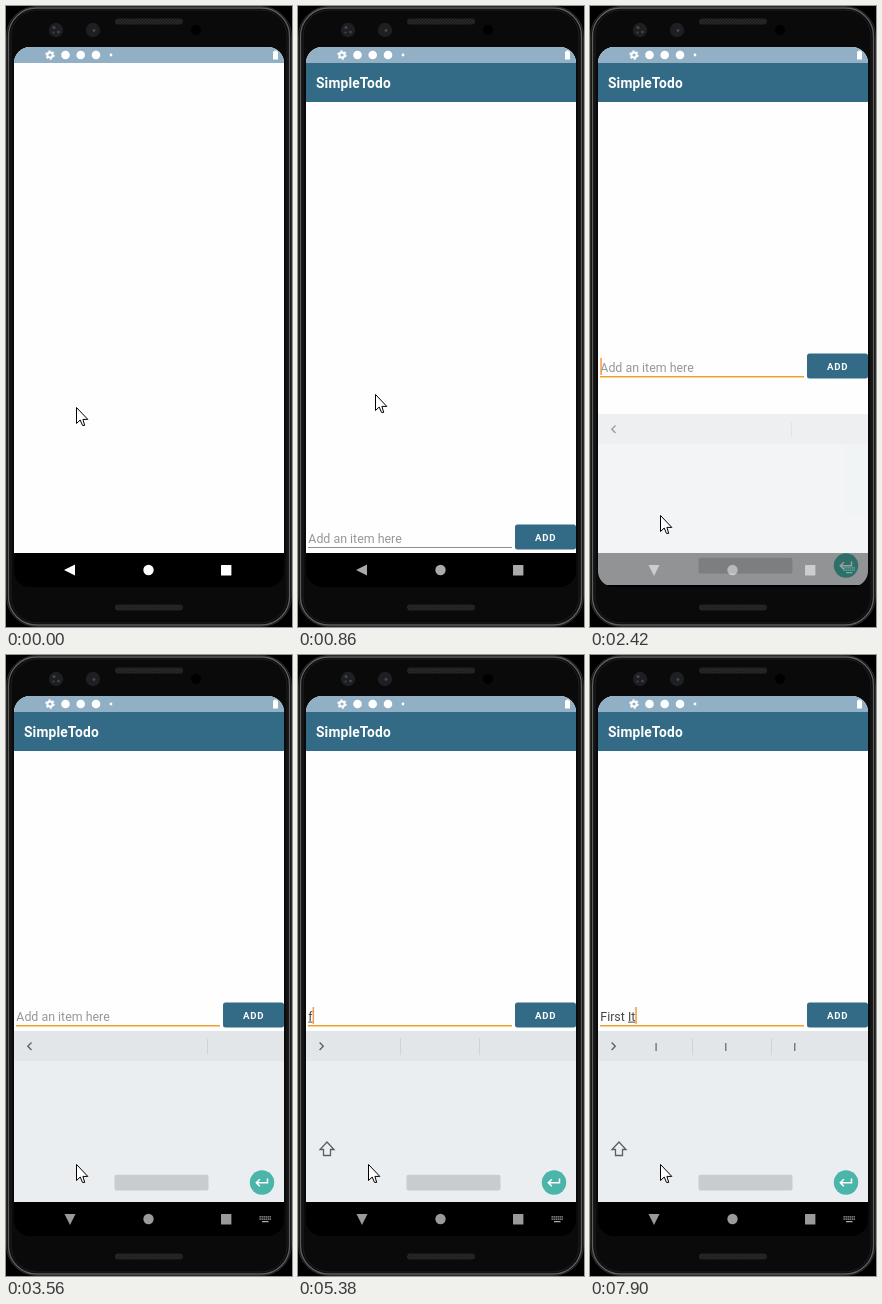
An HTML page for the animation above (8 s loop, 286x621 px).

```html
<!DOCTYPE html>
<html lang="en">
<head>
<meta charset="utf-8">
<title>Todo app on a phone</title>
<style>
  html, body { margin: 0; width: 100%; height: 100%; overflow: hidden; background: #000; }
  svg { display: block; width: 286px; height: 621px; font-family: Roboto, sans-serif; }
  text { white-space: pre; }
  .field { font-size: 12.4px; }
  .strong { font-weight: 600; fill: #fff; }
  .hints text { font-size: 11.5px; fill: #4f565a; text-anchor: middle; }
  .icon { fill: none; stroke: #566066; stroke-width: 1.3; }
</style>
</head>
<body>
<svg viewBox="0 0 286 621">
  <defs>
    <clipPath id="screen"><rect x="8" y="41" width="270" height="540" rx="16"/></clipPath>
    <pattern id="mesh" width="3" height="3" patternUnits="userSpaceOnUse">
      <rect width="3" height="3" fill="#1c1c1c"/>
      <path d="M0 0L3 3M3 0L0 3" stroke="#303030" stroke-width=".6"/>
    </pattern>
  </defs>

  <!-- Phone body -->
  <g fill="none">
    <rect x=".5" y=".5" width="285" height="620" rx="30" fill="#0a0a0a" stroke="#2c2c2c"/>
    <rect x="2.5" y="2" width="281" height="617" rx="28" stroke="#5e5e5e" stroke-width="1.4"/>
    <rect x="5" y="4" width="276" height="613" rx="26" stroke="#1f1f1f"/>
  </g>
  <rect x="109" y="12.5" width="68" height="6" rx="3" fill="url(#mesh)"/>
  <rect x="109" y="598.5" width="68" height="6" rx="3" fill="url(#mesh)"/>
  <g fill="#1d1f22">
    <circle cx="50" cy="24" r="7.2"/><circle cx="87" cy="24" r="7.2"/>
    <circle cx="190" cy="24" r="5" fill="#000"/>
  </g>
  <g fill="#45494e">
    <circle cx="48" cy="21.5" r="1.5"/><circle cx="52.5" cy="26" r="1.3"/>
    <circle cx="47.5" cy="26.5" r="1"/><circle cx="88" cy="24.5" r="1.4"/>
  </g>

  <g clip-path="url(#screen)">
    <rect x="8" y="41" width="270" height="506" fill="#fefefe"/>
    <rect x="8" y="41" width="270" height="16" fill="#91afc5"/>
    <g fill="#fff">
      <circle cx="44" cy="49" r="2.6" fill="none" stroke="#fff" stroke-width="2"/>
      <circle cx="44" cy="49" r="4" fill="none" stroke="#fff" stroke-width="1.4" stroke-dasharray="2.1 2.09"/>
      <circle cx="59.5" cy="49" r="4.3"/><circle cx="74.7" cy="49" r="4.3"/><circle cx="90" cy="49" r="4.3"/>
      <circle cx="105" cy="49" r="1.4"/>
      <path d="M267 45.5h1.3v-1h2.4v1h1.3v8h-5z"/>
    </g>

    <g id="app">
      <rect x="8" y="57" width="270" height="39" fill="#336b87"/>
      <text class="strong" x="18" y="82" font-size="13.75" letter-spacing=".17">SimpleTodo</text>
      <g id="entry">
        <text class="field" id="hint" x="10.3" y="365.5" fill="#989898">Add an item here</text>
        <text class="field" id="typed" x="10.3" y="365.5" fill="#454545"></text>
        <rect id="composing" y="366.6" height="1" fill="#454545"/>
        <rect id="line" x="10" y="370" width="204"/>
        <rect id="caret" y="352" width="1.5" height="17" fill="#f39a4b"/>
        <rect x="217" y="347.6" width="61" height="24.8" rx="2.5" fill="#336b87"/>
        <text class="strong" x="237" y="363.6" font-size="9.63" letter-spacing=".8">ADD</text>
      </g>
    </g>

    <!-- Navigation bar -->
    <rect x="8" y="547" width="270" height="34"/>
    <g id="nav">
      <path id="back" d="M58 564L69 558.5V569.5Z"/>
      <circle cx="142.5" cy="564" r="5.2"/>
      <rect x="215" y="559" width="10.4" height="10.4" rx=".5"/>
      <g id="switcher" fill="none" stroke="#aaa" stroke-width="1.2">
        <path d="M253.5 561.8h11.5M253.5 564.2h11.5" stroke-dasharray="1.4 .6"/>
        <path d="M256 566.6h6.5"/>
      </g>
    </g>

    <g id="keyboard">
      <rect x="8" y="376" width="270" height="171" fill="#eaeef1"/>
      <rect x="8" y="376" width="270" height="30" fill="#e3e6e8"/>
      <g id="closedStrip">
        <path class="icon" d="M25.5 387.5L21.8 391.2L25.5 395"/>
        <path d="M201.5 384v15" stroke="#d0d4d7"/>
      </g>
      <g id="openStrip">
        <path class="icon" d="M21.6 387.5L25.3 391.2L21.6 395"/>
        <path d="M102.5 383v17M181.5 383v17" stroke="#d0d4d7"/>
        <g class="hints">
          <text x="66" y="395.5"></text><text x="135.7" y="395.5"></text><text x="204.7" y="395.5"></text>
        </g>
      </g>
      <path class="icon" id="shift" d="M29 487L36 494.5H32.5V500.5H25.5V494.5H22Z"/>
      <rect x="108.5" y="519.8" width="94" height="15.7" rx="2" fill="#c9cccf"/>
      <circle cx="256" cy="527.5" r="12.2" fill="#4bb5aa"/>
      <path d="M261.5 523.5V527.8H250.5M253.8 524.3L250.3 527.8L253.8 531.3" fill="none" stroke="#fff" stroke-width="1.5"/>
    </g>
  </g>

  <path id="cursor" d="M.5 .5V16.5L4.2 13L6.5 18.4H8.7L6.9 12.4H11.8Z" fill="#fff" stroke="#000"/>
</svg>

<script>
const LOOP = 8000;
const BLINK = 505;
const $ = id => document.getElementById(id);
const set = (id, attrs) => {
  for (const name in attrs) $(id).setAttribute(name, attrs[name]);
};
const show = (id, on) => set(id, { opacity: on ? 1 : 0 });

// Each row starts with the time from which it holds.
const lastRow = (rows, t) => rows.filter(row => row[0] <= t).pop();

// time, app opacity, navigation icon grey
const launch = [[0, 0, 255], [240, .3, 225], [360, .7, 195], [500, 1, 170], [1920, 1, 154]];

// time, x, y
const pointer = [
  [0, 70, 401], [620, 71, 398], [740, 73, 393], [860, 77, 388], [980, 90, 372], [1100, 107, 359],
  [1250, 119, 415], [1380, 110, 472], [1520, 88, 510], [1650, 71, 533], [1770, 74, 529],
  [2300, 72, 517], [2420, 70, 509],
];

// time, drop below resting place, opacity
const slide = [[0, 172, 0], [2300, 80, .25], [2420, 32, .62], [2540, 0, 1]];

// time, turn of the back arrow, opacity of the keyboard switcher
const turn = [[0, 0, 0], [2040, -45, .5], [2160, -90, 1]];

// time, offset of the entry row, line height, line colour
const entry = [[0, 171, 1, "#8e8e8e"], [1920, 171, 1.5, "#f39a56"], [2300, 0, 1.5, "#f1a02c"]];

// time, text, suggestions
const typing = [[0, "", []], [1920, "", []], [2040, "", []]];
const type = (start, gap, words, suggest) =>
  words.forEach((word, i) => typing.push([start + i * gap, word, suggest(word)]));
const prefixes = word => [...word].map((_, i) => word.slice(0, i + 1));
const completing = word => word.length > 1 && !word.endsWith(" ");

const lower = prefixes("first ");
const oneSlot = word => completing(word) ? [word] : [];
type(3930, 120, lower, oneSlot);
type(4900, 120, lower.slice(0, -1).reverse(), oneSlot);
type(5890, 0, [""], () => []);
type(6660, 0, ["F"], () => []);
type(6930, 120, prefixes("First ").slice(1), word => completing(word) ? [word, word, word] : []);
type(7780, 120, ["First I", "First It"], () => ["I", "I", "I"]);

function drawEntry(t) {
  const [, offset, height, fill] = lastRow(entry, t);
  set("entry", { transform: `translate(0 ${offset})` });
  set("line", { height, fill });

  const [since, text, suggestions] = lastRow(typing, t);
  const typed = $("typed");
  const widthOf = string => {
    typed.textContent = string;
    return string ? typed.getComputedTextLength() : 0;
  };
  const wordStart = widthOf(text.slice(0, text.lastIndexOf(" ") + 1));
  const end = widthOf(text);
  set("composing", { x: 10.3 + wordStart, width: end - wordStart });
  set("caret", { x: 10.3 + end });
  show("caret", t >= 1920 && Math.floor((t - since) / BLINK) % 2 === 0);

  show("hint", !text);
  show("closedStrip", !text);
  show("openStrip", text);
  show("shift", t >= 3930);
  document.querySelectorAll(".hints text").forEach((slot, i) => {
    slot.textContent = suggestions[i] || "";
  });
}

function draw(t) {
  const [, appOpacity, grey] = lastRow(launch, t);
  set("app", { opacity: appOpacity });
  set("nav", { fill: `rgb(${grey},${grey},${grey})` });

  const [, angle, switcherOpacity] = lastRow(turn, t);
  set("back", { transform: `rotate(${angle} 64 564)` });
  set("switcher", { opacity: switcherOpacity });

  const [, drop, opacity] = lastRow(slide, t);
  set("keyboard", { transform: `translate(0 ${drop})`, opacity });

  const [, x, y] = lastRow(pointer, t);
  set("cursor", { transform: `translate(${x} ${y})` });

  drawEntry(t);
}

const start = performance.now();
function frame() {
  draw((performance.now() - start) % LOOP);
  requestAnimationFrame(frame);
}
frame();
</script>
</body>
</html>
```
